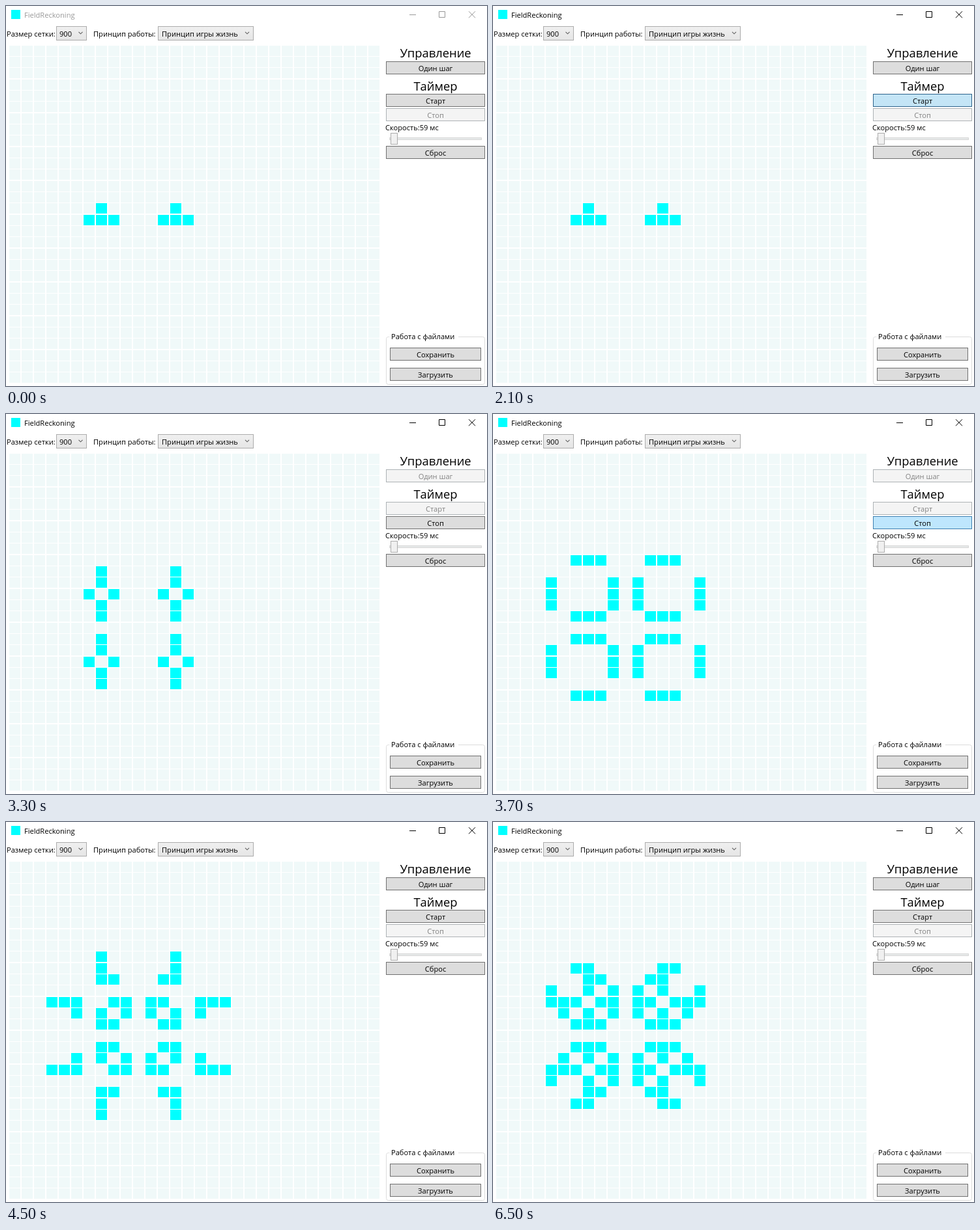
Write an HTML page that moves like this. It is 738 px wide and 584 px high and loops after 8 s.

```html
<!DOCTYPE html>
<html lang="ru">
<head>
<meta charset="utf-8">
<title>FieldReckoning</title>
<style>
  html, body { margin: 0; width: 738px; height: 584px; overflow: hidden; background: #fff; }
  svg { display: block; }
  text { font-family: "Open Sans", "Noto Sans", sans-serif; font-size: 11.1px; fill: #000; }
  .mid { text-anchor: middle; }
  .head { font-size: 18.4px; }
  .chevron { fill: none; stroke: #606060; stroke-width: 1.1; }
  .btn rect { fill: #ddd; stroke: #707070; }
  .btn.hover rect { fill: #bee6fd; stroke: #3c7fb1; }
  .btn.press rect { fill: #c4e5f6; stroke: #2c628b; }
  .btn.off rect { fill: #f4f4f4; stroke: #adb2b5; }
  .btn.off text { fill: #838383; }
  .caption path { fill: none; stroke: #000; }
  .caption.idle path { stroke: #999; }
  .caption.idle text { fill: #999; }
  .cell { fill: #f0f9f9; }
  .cell.live { fill: #0ff; }
</style>
</head>
<body>
<svg id="stage" width="738" height="584" viewBox="0 0 738 584">
  <defs>
    <linearGradient id="combo" x1="0" y1="0" x2="0" y2="1">
      <stop offset="0" stop-color="#f0f0f0"/>
      <stop offset="1" stop-color="#e5e5e5"/>
    </linearGradient>
  </defs>
  <rect width="738" height="584" fill="#fff"/>

  <rect x="8" y="6" width="14" height="14" fill="#0ff"/>
  <g id="caption" class="caption">
    <text x="28" y="18">FieldReckoning</text>
    <path d="M619 13.5H629M664.5 8.5H673.5V17.5H664.5Z"/>
    <path d="M710 8.2L720 18.2M720 8.2L710 18.2"/>
  </g>

  <text x="1" y="47">Размер сетки:</text>
  <rect x="77.5" y="31.5" width="46" height="21" fill="url(#combo)" stroke="#acacac"/>
  <text x="82" y="47">900</text>
  <path class="chevron" d="M111.5 39.8L114.5 42.8L117.5 39.8"/>
  <text x="134" y="47">Принцип работы:</text>
  <rect x="233.5" y="31.5" width="146" height="21" fill="url(#combo)" stroke="#acacac"/>
  <text x="239" y="47">Принцип игры жизнь</text>
  <path class="chevron" d="M367 39.8L370 42.8L373 39.8"/>

  <g id="grid"></g>

  <text class="mid head" x="659" y="79">Управление</text>
  <text class="mid head" x="659" y="130">Таймер</text>
  <text x="582" y="191">Скорость:59 мс</text>
  <rect x="588.5" y="202.5" width="141" height="3" fill="#e7eaea" stroke="#d6d6d6"/>
  <rect x="590.5" y="195.5" width="10" height="17" fill="#f0f0f0" stroke="#acacac"/>

  <rect x="583.5" y="508.5" width="151" height="73" rx="3" fill="none" stroke="#dcdcdc"/>
  <rect x="588" y="500" width="106" height="16" fill="#fff"/>
  <text x="591" y="512">Работа с файлами</text>
  <g id="buttons"></g>
</svg>
<script>
const LOOP = 8000, SIZE = 30;
const $ = id => document.getElementById(id);

function add(parent, tag, attrs, text = "") {
  const el = document.createElementNS("http://www.w3.org/2000/svg", tag);
  for (const key in attrs) el.setAttribute(key, attrs[key]);
  el.textContent = text;
  return parent.appendChild(el);
}

function button(label, y, x = 583, w = 152) {
  const g = add($("buttons"), "g", { class: "btn" });
  add(g, "rect", { x: x + .5, y: y + .5, width: w - 1, height: 19 });
  add(g, "text", { class: "mid", x: x + w / 2, y: y + 15 }, label);
  return g;
}

const controls = [button("Один шаг", 85), button("Старт", 135), button("Стоп", 157)];
button("Сброс", 215);
button("Сохранить", 525, 589, 140);
button("Загрузить", 556, 589, 140);

// Time, then the looks of the step, start and stop buttons
const LOOKS = { n: "", h: "hover", p: "press", d: "off" };
const STATES = [
  [0, "nnd"], [100, "hnd"], [200, "nnd"], [700, "nhd"], [2100, "npd"],
  [2200, "ddn"], [3700, "ddh"], [4400, "ddp"], [4500, "nnd"],
  [5400, "nhd"], [5500, "nnd"], [5800, "hnd"], [5900, "pnd"],
  [6000, "hnd"], [6500, "nnd"]
];

// Generation on view at every 100 ms while the timer runs
const RUN_FROM = 2200, STEP_AT = 6000;
const RUN = [0, 1, 3, 5, 6, 8, 9, 11, 13, 14, 16, 18, 19, 21, 22, 24, 25, 27, 29, 30, 32, 34, 35, 37];
const LAST = RUN[RUN.length - 1];

const cells = [];
for (let r = 0; r < SIZE; r++) {
  const top = 60.7 + r * 52 / 3;
  const y = Math.round(top), bottom = Math.round(top + 52 / 3 - 1.3);
  for (let c = 0; c < SIZE; c++) {
    cells.push(add($("grid"), "rect", { class: "cell", x: 5 + 19 * c, y, width: 17, height: bottom - y }));
  }
}

function nextGeneration(grid) {
  const at = (r, c) => r >= 0 && c >= 0 && r < SIZE && c < SIZE && grid[r * SIZE + c] ? 1 : 0;
  return grid.map((live, i) => {
    const r = Math.floor(i / SIZE), c = i % SIZE;
    let sum = -at(r, c);
    for (let dr = -1; dr <= 1; dr++)
      for (let dc = -1; dc <= 1; dc++) sum += at(r + dr, c + dc);
    return sum === 3 || (live && sum === 2);
  });
}

const seed = new Array(SIZE * SIZE).fill(false);
for (const c of [7, 13]) {
  seed[14 * SIZE + c] = true;
  for (const d of [-1, 0, 1]) seed[15 * SIZE + c + d] = true;
}
const history = [seed];
while (history.length <= LAST + 1) history.push(nextGeneration(history[history.length - 1]));

function generationAt(t) {
  if (t >= STEP_AT) return LAST + 1;
  const i = Math.floor((t - RUN_FROM) / 100);
  return RUN[Math.max(0, Math.min(RUN.length - 1, i))];
}

let shown = -1;
function draw(t) {
  const looks = STATES.filter(s => s[0] <= t).pop()[1];
  controls.forEach((g, i) => g.setAttribute("class", "btn " + LOOKS[looks[i]]));
  $("caption").setAttribute("class", t < 2100 ? "caption idle" : "caption");

  const gen = generationAt(t);
  if (gen === shown) return;
  shown = gen;
  cells.forEach((el, i) => el.setAttribute("class", history[gen][i] ? "cell live" : "cell"));
}

const start = performance.now();
function tick() {
  draw((performance.now() - start) % LOOP);
  requestAnimationFrame(tick);
}
tick();
</script>
</body>
</html>
```
